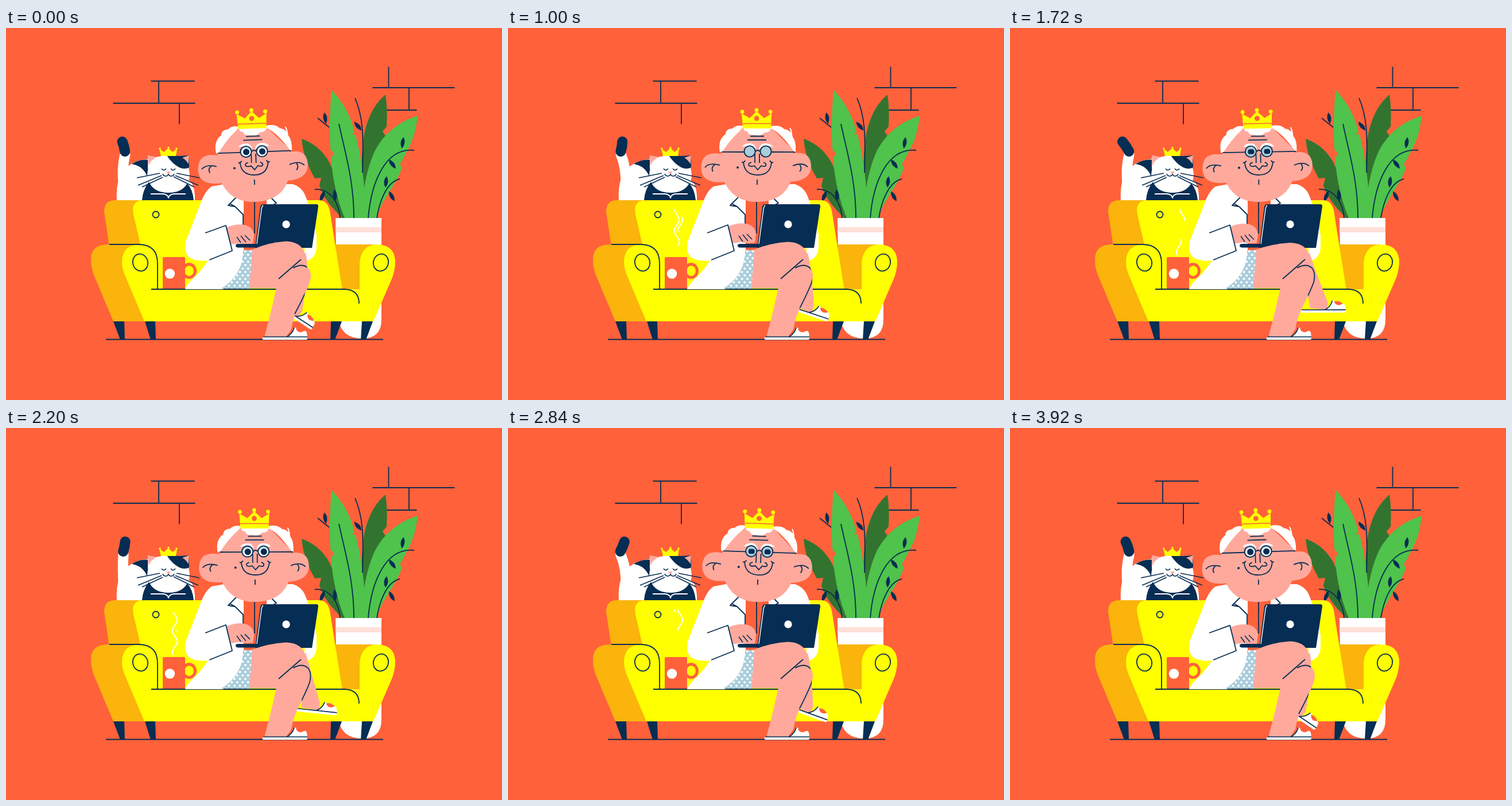
These frames come from a looping animation (864x648 px, 3.96 s). An HTML page with a canvas:

```html
<!DOCTYPE html>
<html lang="en">
<head>
<meta charset="utf-8">
<title>Sofa afternoon</title>
<style>
html, body { margin: 0; width: 100%; height: 100%; overflow: hidden; background: #ff613a; }
canvas { display: block; }
</style>
</head>
<body>
<canvas id="stage" width="864" height="648"></canvas>
<script>
const ctx = document.getElementById('stage').getContext('2d');
const LOOP = 3960, STEP = 40, TAU = Math.PI * 2;
const ORANGE = '#ff613a', NAVY = '#062d53', YELLOW = '#ffff00', AMBER = '#fab40b', PINK = '#ffa99d',
  WHITE = '#fff', GREEN = '#4fc34b', FOREST = '#32742f', BLUE = '#a9cddb';

const clamp = x => Math.max(0, Math.min(1, x));
const mix = (a, b, p) => a + (b - a) * p;
const ramp = (u, from, to) => clamp((u - from) / (to - from));
const wave = (t, period, shift = 0) => Math.cos(TAU * (t / period - shift));

const cache = {};
const path = d => cache[d] || (cache[d] = new Path2D(d));

function fill(d, color) {
  ctx.fillStyle = color;
  ctx.fill(typeof d === 'string' ? path(d) : d);
}
function line(d, color = NAVY, width = 1.8) {
  ctx.strokeStyle = color;
  ctx.lineWidth = width;
  ctx.stroke(typeof d === 'string' ? path(d) : d);
}
function oval(x, y, rx, ry = rx, tilt = 0) {
  const p = new Path2D();
  p.ellipse(x, y, rx, ry, tilt, 0, TAU);
  return p;
}
function placed(x, y, angle, draw) {
  ctx.save();
  ctx.translate(x, y);
  ctx.rotate(angle);
  draw();
  ctx.restore();
}

function drawRoom() {
  fill('M0 0H864V648H0Z', ORANGE);
  placed(-.5, -.5, 0, () =>
    line('M253 93H329M266.500 93V131.500M187 131.500H330M302.500 131.500V168M667 68V104.500M639 104.500H782M702.500 104.500V143.500M640 143.500H716'));
}

function sprig(x, y, angle) {
  placed(x, y, angle, () => fill('M0 -10Q7 0 0 10Q-7 0 0 -10Z', NAVY));
}

function drawPlant() {
  fill('M515 193Q552 206 568 244L600 331H585L577 322Q552 296 546 274L549 261L538 262Q518 228 515 193Z', FOREST);
  fill('M661 116Q665 142 663 172L656 180L661 188Q656 220 640 250L622 292Q617 240 622 196Q630 142 661 116Z', FOREST);
  fill('M717 153Q714 187 700 212L691 229L686 238L690 243Q682 264 668 285L661 297Q651 312 645 331H622V292Q628 245 643 213Q667 168 717 153Z', GREEN);
  fill('M567 108Q597 139 607 181L602 186L609 185Q622 238 625 292L632 331H590Q571 286 566 226L572 219L565 212Q562 165 567 108Z', GREEN);
  line('M580 167C590 215 606 265 606 331M711 213C660 208 636 270 631 331M686 263C662 268 650 305 646 331');
  line('M608 122C622 155 623 185 621 252M543 157L563 173M538 281C566 280 580 305 582 331');
  sprig(556, 157, -.15);
  sprig(613, 171, -.7);
  sprig(691, 200, .15);
  sprig(673, 237, -.65);
  sprig(662, 268, .1);
  sprig(672, 293, -.5);
  sprig(551, 293, .4);
  sprig(573, 291, -.1);
  fill('M574 331H654V508Q654 541 620 541Q582 541 577 500Z', WHITE);
  fill('M574 347H654V356H574Z', '#ffe0d8');
}

function drawTail(t) {
  const base = 202 + 6 * wave(t, 1980, .93), tip = 201 + 8.5 * wave(t, 1980, .22);
  const middle = 204 - 3 * wave(t, 1980, .93);
  ctx.lineCap = 'round';
  line(new Path2D(`M205 275Q${middle} 245 ${base} 220`), WHITE, 18);
  line(new Path2D(`M${base - .3} 215Q${(base + tip) / 2 + 1} 206 ${tip} 198`), NAVY, 18);
  ctx.lineCap = 'butt';
}

function drawCat(t) {
  drawTail(t);
  fill('M193 300Q191 268 203 251Q220 228 254 228L310 262Q330 264 329 300Z', WHITE);
  fill('M219 237Q234 227 252 230L246 259Q239 240 219 237Z', NAVY);
  fill('M249 268Q238 282 237 300H327Q325 280 315 270Z', NAVY);
  line('M252 289H274Q282 290 283 296Q284 290 292 289H313', WHITE);
  fill('M247 222L266 226L247 246Z', WHITE);
  fill('M256 227Q283 217 310 227Q320 240 320 259Q314 287 283 287Q252 287 246 259Q246 240 256 227Z', WHITE);
  fill('M247 222L262 225Q251 231 248 240Z', PINK);
  fill('M280 222L302 223L319 222V243Q311 247 302 243Q290 237 280 222Z', NAVY);
  fill('M307 226L319 222L318 237Q313 229 307 226Z', PINK);
  fill('M270 223L267 210L275 216L283 209L290 216L298 210L296 223Z', YELLOW);
  for (const [x, y] of [[268, 210], [283, 208.5], [297, 210]]) fill(oval(x, y, 1.8), YELLOW);
  line('M271 245Q275 250 279 245M287 245Q291 250 295 245M273 254Q274 258 279 258Q283 257 283 253Q283 257 287 258Q292 258 293 254', NAVY, 1.6);
  fill('M279 250H287L283 255Z', PINK);
  line('M228 261L268 253M230 274L271 257M237 277L273 260M297 253L337 261M295 257L335 274M292 259L328 277', NAVY, 1.5);
}

function drawSofa() {
  fill('M171 320Q171 300 190 300H245V380H180Z', AMBER);
  fill('M574 377H645V460H580Z', AMBER);
  fill('M222 325Q217 300 240 300H545Q560 300 564 318L586 457H250L234 377Z', YELLOW);
  fill('M148 405Q147 377 178 377H235L245 511H187L155 435Q148 420 148 405Z', AMBER);
  fill('M202 408Q202 377 234 377Q264 378 264 410V455H616V410Q618 377 648 377Q679 379 678 410Q677 425 672 437L640 511H241L209 435Q202 420 202 408Z', YELLOW);
  fill('M187 511H206L207 543H199ZM242 511H260L261 543H252ZM566 511H585L573 543H565ZM620 511H639L627 543H618Z', NAVY);
  line('M174 542.500H657M180 377H232Q264 378 264 410V455M253 455H590Q615 456 615 480');
  line(oval(234, 408.5, 13, 15, -.25));
  line(oval(653, 408.5, 13, 15, .25));
  line(oval(261, 325, 5.5));
}

function drawMug() {
  line(oval(319, 423, 10.5, 11.5), ORANGE, 5);
  fill('M275 399H310Q312 399 312 401V454H273V401Q273 399 275 399Z', ORANGE);
  fill(oval(285.5, 428, 8.7), WHITE);
}

// A wisp is a vertical sine strand, visible between its rising head and tail.
function wisp(head, tail, center, crest) {
  if (tail - head < 1) return;
  const p = new Path2D();
  for (let y = head; y <= tail; y++) p.lineTo(center + 4.2 * Math.cos(TAU * (y - crest) / 38), y);
  ctx.lineCap = 'round';
  line(p, WHITE, 2);
  ctx.lineCap = 'butt';
}
function drawSteam(t) {
  for (const start of [20, 1420]) {
    const u = t - start;
    wisp(mix(398, 317, ramp(u, 0, 820)), mix(398, 317, ramp(u, 700, 1450) ** 1.5), 294, 334);
    wisp(mix(355, 316, ramp(u, 760, 1100)), mix(355, 316, ramp(u, 1400, 2000)), 300, 334);
  }
}

function drawCoat() {
  fill('M358 276Q346 284 338 308L313 372Q308 397 326 403Q338 407 352 405Q338 426 325 437Q316 446 312 455H377L425 440L440 383H520V407Q541 402 541 380V360L527 307L521 291Q515 277 500 272H380Z', WHITE);
  const shorts = 'M413 388Q413 430 375 454H425L432 384Z';
  fill(shorts, BLUE);
  ctx.save();
  ctx.clip(path(shorts));
  for (let row = 0; row < 12; row++)
    for (let col = 0; col < 7; col++) fill(oval(379 + col * 9.5 + row % 2 * 4.75, 389 + row * 6, 2.1), WHITE);
  ctx.restore();
  fill('M414 295H454V386L414 387Z', ORANGE);
  line('M433 300V358M404 292L387 309L399 311L390 306M399 311L413 325V346M460 294L471 305L465 308');
}

function drawHand(t) {
  const bob = wave(t, 396);
  ctx.save();
  ctx.translate(0, bob);
  fill('M383 347Q400 339 416 342Q431 346 432 360L430 375Q418 377 406 374L392 376Z', PINK);
  line('M402 363L409 373M409 361L418 372M416 360L425 369', NAVY, 1.6);
  ctx.restore();
  line(new Path2D(`M347 357L383 ${343.5 + bob * .5}L394 388L354 404`));
}

function drawLaptop() {
  fill('M404 376H440V382.5H404Q400 382 400 379Q400 376 404 376Z', NAVY);
  fill('M443 311Q444 307 448 307H541Q544 307 544 311L533 383H434Z', NAVY);
  line('M448 309Q446 310 445 316L437 376', WHITE, 1.4);
  fill(oval(488, 342, 6.7), WHITE);
}

// Slipper with its toe at the origin.
function slipper() {
  fill('M-78 0H0V3Q0 5 -3 5H-78Z', WHITE);
  fill('M-36 0Q-26 -5 -24 -16Q-19 -17 -18 -12Q-13 -7 -8 -10Q-2 -12 -1 -7L0 0Z', WHITE);
  fill('M-20 -14Q-13 -17 -5 -11Q-8 -8 -13 -8Q-18 -9 -20 -14Z', ORANGE);
  line('M-77 0H0M-36 0Q-26 -5 -23 -16', NAVY, 1.7);
}

function drawLegs(t) {
  const degrees = 12 - 22 * wave(t, 1320, .46), angle = degrees * Math.PI / 180;
  const lift = clamp(degrees / 33) * 2.5, drop = degrees + 7.5;
  const bulge = Math.sin(clamp(drop / 41) * Math.PI);
  const toe = [594 - 1.46 * drop + 2.5 * bulge, 485 + .9 * drop - 1.5 * bulge];
  const fromToe = (x, y) => [
    toe[0] + x * Math.cos(angle) - y * Math.sin(angle),
    toe[1] + x * Math.sin(angle) + y * Math.cos(angle)];
  const front = fromToe(-31, -13), sole = fromToe(-32, 0), heel = fromToe(-62, -3);

  const shin = new Path2D(`M522 392Q529 416 ${front}L${sole}L${heel}Q518 440 490 410Z`);
  const top = 376 - lift;
  const thigh = new Path2D(`M424 453L429 386Q456 ${top} 488 ${top - 2}Q520 ${top - 1} 523 404L500 430L470 453Z`);
  fill(shin, PINK);
  placed(...toe, angle, slipper);
  fill(thigh, PINK);
  fill('M474 438L500 414Q518 409 527 419Q534 428 529 443Q523 460 510 485Q500 505 497 525L488 538H450Q463 492 474 438Z', PINK);
  placed(525, 538, 0, slipper);
  line('M475 437L514 403');

  const crossing = new Path2D(thigh);
  crossing.addPath(shin);
  ctx.save();
  ctx.clip(crossing);
  line('M500 418Q516 409 526 418Q533 427 529 443Q522 462 503 498');
  ctx.restore();
}

function drawEye(x, open) {
  fill(oval(x, 215, 9.6), BLUE);
  if (open > .05) {
    ctx.save();
    ctx.clip(oval(x, 215, 9));
    ctx.beginPath();
    ctx.rect(x - 10, 215 - 8 * open, 20, 17 * open);
    ctx.clip();
    if (open > .7) fill(oval(x, 217, 8.5), WHITE);
    fill(oval(x + .5, 215.5, 5.6), NAVY);
    ctx.restore();
  }
  line(oval(x, 215, 9.6), NAVY, 1.9);
}

function drawCrown() {
  fill('M409 175L407 149L421 157L433 145L446 157L459 149L458 175Z', YELLOW);
  for (const [x, y] of [[408, 146], [433, 143], [457, 146]]) fill(oval(x, y, 3.4), YELLOW);
  fill(oval(433, 157.5, 4.4), ORANGE);
  line('M409 166.5H458', ORANGE, 1.5);
}

function drawHead(t) {
  const gap = Math.min(t, LOOP - t, Math.abs(t - 2200));
  const open = (.5 + .45 * clamp(1.2 - gap / 120)) * clamp((Math.abs(t - 1000) - 60) / 100);
  placed(433, 302, -2 * wave(t, 792, .01) * Math.PI / 180, () => {
    ctx.translate(-433, -302);
    fill('M378 221Q336 210 336.500 245Q338 273 380 268ZM492 219Q528 211 528 242Q526 268 488 268Z', PINK);
    fill('M404 174H459L494 210Q501 222 497 250Q489 303 433 303Q390 303 374 262Q367 230 373 212Z', PINK);
    fill('M369 216Q365 194 379 185Q379 176 391 175Q398 168 411 171L404 179Q388 193 373 216Z', WHITE);
    fill('M457 171Q474 168 481 176Q494 178 496 190Q502 197 501 216H498Q478 185 457 174Z', WHITE);
    line('M491 174Q496 183 493 193', WHITE, 2);
    fill('M410 172H459Q457 183 447 182Q440 190 428 186Q419 188 417 180Q410 181 410 172Z', WHITE);
    drawCrown();
    fill('M408 207Q412 200 424 201Q431 203 432 211Q420 204 408 207ZM462 207Q458 200 446 201Q438 203 437 211Q450 204 462 207Z', WHITE);
    line('M422 188.500H446M417 195H450M372 216H411M459 216H500M431 215Q435 211 439 215');
    drawEye(421, open);
    drawEye(449, open);
    line('M430 219V235M438 219V235M424 234Q417 236 420 240Q424 242 429 240L435 247L441 240Q446 242 449 240Q451 236 445 234');
    line('M407 234Q411 235 413 231M410 234Q412 256 435 256Q457 256 459 234M456 231Q458 235 462 234M434 264V273');
    line('M343 243Q350 234 369 239M360 238Q353 243 357 250M496 240Q513 233 522 242M508 238Q513 244 508 250');
    fill(oval(400, 243, 2), NAVY);
  });
}

function draw(t) {
  ctx.lineJoin = 'round';
  drawRoom();
  drawPlant();
  drawCat(t);
  drawSofa();
  drawSteam(t);
  drawCoat();
  drawMug();
  drawHand(t);
  drawLaptop();
  drawLegs(t);
  drawHead(t);
}

const begin = performance.now();
function tick() {
  const elapsed = (performance.now() - begin) % LOOP;
  draw(Math.floor(elapsed / STEP) * STEP);
  requestAnimationFrame(tick);
}
tick();
</script>
</body>
</html>
```
